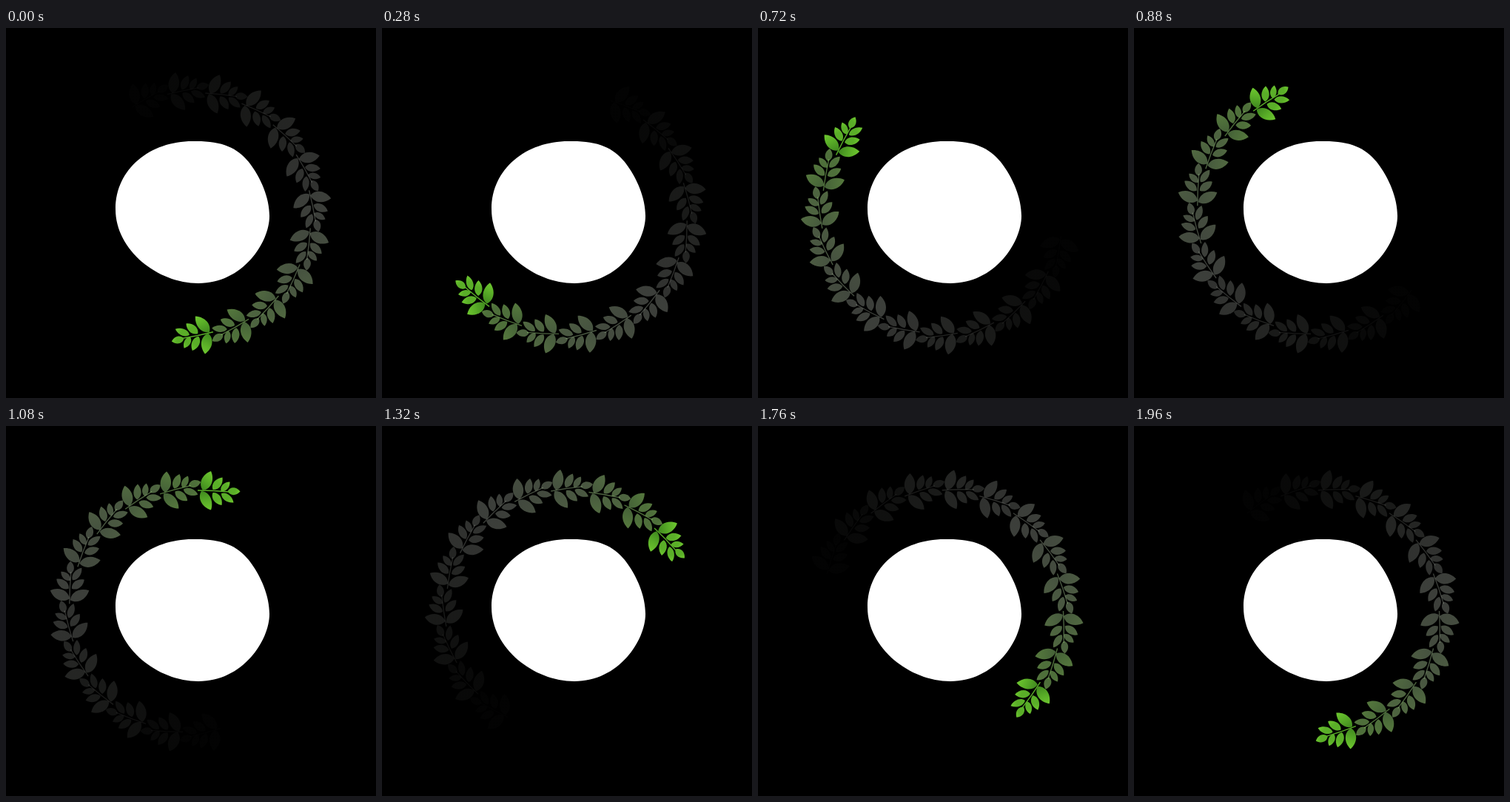
Write an HTML page with a canvas that moves like this. It is 500 px wide and 500 px high and loops after 2 s.

```html
<!DOCTYPE html>
<html lang="en">
<head>
<meta charset="utf-8">
<title>Leaf wreath loader</title>
<style>
html, body { margin: 0; width: 100%; height: 100%; overflow: hidden; background: #000; }
canvas { display: block; width: 500px; height: 500px; }
</style>
</head>
<body>
<canvas id="stage" width="500" height="500"></canvas>
<script>
const ctx = document.getElementById('stage').getContext('2d');
const LOOP = 2000, STEP = 40, COPIES = 12, GAP = 18;
const CX = 249, CY = 250.2;
const DARK = [62, 134, 30], MID = [90, 174, 40], LIGHT = [112, 202, 48];
const PALE = [222, 228, 218];

// Base x, y, tip x, y, half width; the sprig lies at the top of the ring.
const leaves = [
  [266, 87, 277, 61, 7.2],
  [264, 88, 277, 113.5, 7],
  [279.5, 86, 292.5, 69.5, 5.2],
  [279.5, 90, 291.5, 107, 5.2],
  [290.5, 88, 302.5, 75.5, 4.3],
  [291, 91, 307.5, 103.5, 4.6],
  [299.5, 88, 316.5, 88.5, 4.9]
];

function tint(c, pale) {
  return `rgb(${c.map((v, i) => Math.round(v + (PALE[i] - v) * pale)).join(',')})`;
}

function leaf([x0, y0, x1, y1, w], pale) {
  const len = Math.hypot(x1 - x0, y1 - y0);
  ctx.save();
  ctx.translate(x0, y0);
  ctx.rotate(Math.atan2(y1 - y0, x1 - x0));
  const fill = ctx.createLinearGradient(0, -w * 0.6, len, w * 0.6);
  fill.addColorStop(0, tint(len > 22 ? DARK : MID, pale));
  fill.addColorStop(0.55, tint(MID, pale));
  fill.addColorStop(1, tint(LIGHT, pale));
  const h = w / 0.75;
  ctx.beginPath();
  ctx.moveTo(0, 0);
  ctx.bezierCurveTo(len * 0.2, -h, len * 0.68, -h, len, 0);
  ctx.bezierCurveTo(len * 0.68, h, len * 0.2, h, 0, 0);
  ctx.fillStyle = fill;
  ctx.fill();
  ctx.restore();
}

function sprig(deg, alpha, pale) {
  ctx.save();
  ctx.globalAlpha = alpha;
  ctx.translate(CX, CY);
  ctx.rotate(deg * Math.PI / 180);
  ctx.translate(-CX, -CY);
  ctx.beginPath();
  ctx.moveTo(259, 87);
  ctx.quadraticCurveTo(280, 87, 302, 89);
  ctx.lineWidth = 1.4;
  ctx.strokeStyle = tint(MID, pale);
  ctx.stroke();
  leaves.forEach(l => leaf(l, pale));
  ctx.restore();
}

function blob() {
  ctx.beginPath();
  ctx.moveTo(252, 153);
  ctx.bezierCurveTo(290, 152, 312, 161, 328, 181);
  ctx.bezierCurveTo(345, 203, 356, 230, 356, 254);
  ctx.bezierCurveTo(356, 290, 320, 345, 260, 345);
  ctx.bezierCurveTo(205, 345, 148, 300, 148, 245);
  ctx.bezierCurveTo(148, 190, 195, 153, 252, 153);
  ctx.fillStyle = '#fff';
  ctx.fill();
}

const start = performance.now();

function draw(now) {
  const t = Math.floor(Math.max(0, now - start) % LOOP / STEP) * STEP;
  const head = (t - 1080) * 360 / LOOP;
  ctx.fillStyle = '#000';
  ctx.fillRect(0, 0, 500, 500);
  blob();
  for (let k = COPIES - 1; k > 0; k--) {
    const fade = 1 - k / COPIES;
    sprig(head - k * GAP, 0.66 * Math.pow(fade, 1.6), Math.min(1, 0.2 + k * 0.15));
  }
  sprig(head, 1, 0);
  requestAnimationFrame(draw);
}
draw(start);
</script>
</body>
</html>
```
